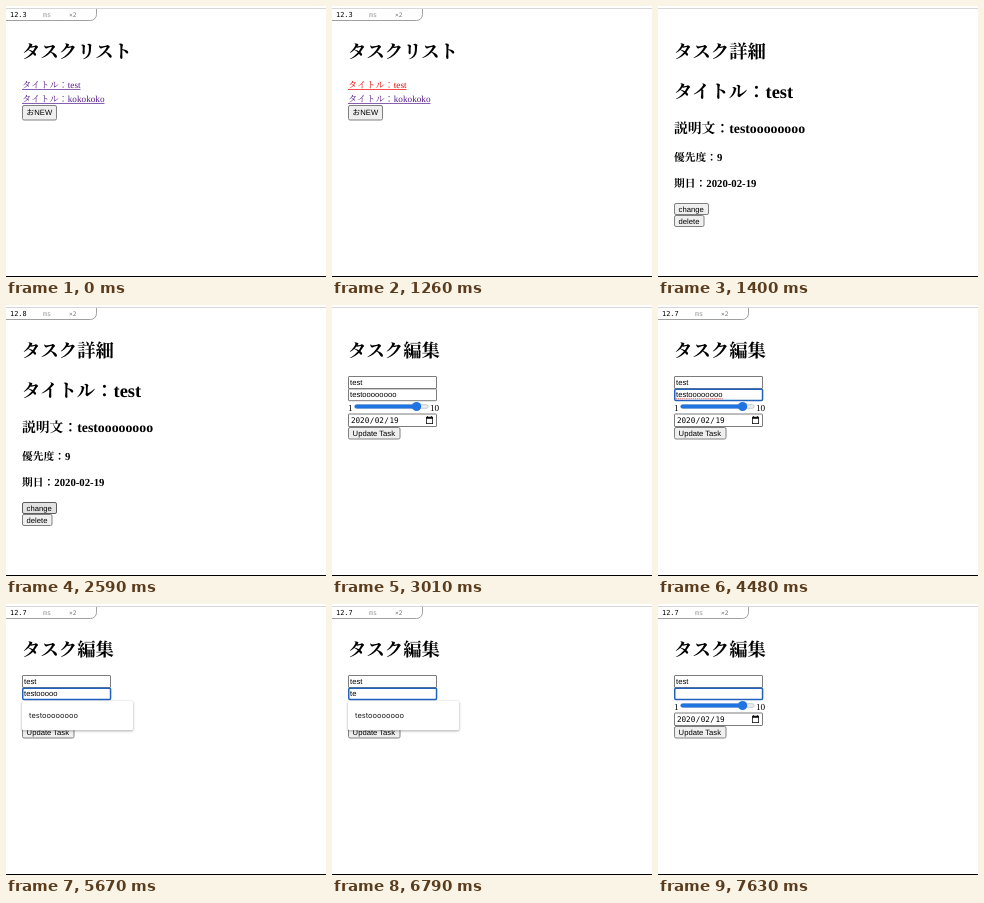
An HTML page with a canvas that plays this animation: 320 px wide and 271 px high, repeating every 8 s.

```html
<!DOCTYPE html>
<html lang="ja">
<head>
<meta charset="utf-8">
<title>Task list</title>
<style>
  html, body { margin: 0; width: 100%; height: 100%; overflow: hidden; background: #fff; }
  canvas { display: block; width: 320px; height: 271px; }
</style>
</head>
<body>
<canvas id="stage"></canvas>
<script>
const W = 320, H = 271, LOOP = 8000;
const SERIF = '"Liberation Serif", "Noto Serif CJK JP", "Noto Sans CJK JP", serif';
const SANS = '"Liberation Sans", "Noto Sans CJK JP", sans-serif';
const MONO = '"DejaVu Sans Mono", monospace';
const UI = 'Inter, sans-serif';
const FIELD = 7.67, BODY = 9.2, H1 = 18.4, H2 = 13.8, H3 = 10.76;
const LEFT = 16;

const canvas = document.getElementById('stage');
const ctx = canvas.getContext('2d');
const ratio = window.devicePixelRatio || 1;
canvas.width = Math.round(W * ratio);
canvas.height = Math.round(H * ratio);
ctx.scale(ratio, ratio);
ctx.textRendering = 'geometricPrecision';

const within = (t, from, to) => t >= from && t < to;

// Value of the last [time, value] pair already reached.
function step(t, pairs) {
  let value = pairs[0][1];
  for (const [start, v] of pairs) if (t >= start) value = v;
  return value;
}

function text(str, x, y, size, family, color = '#000', weight = 'normal') {
  ctx.font = `${weight} ${size}px ${family}`;
  ctx.fillStyle = color;
  ctx.fillText(str, x, y);
  return ctx.measureText(str).width;
}

function rect(x, y, w, h, color) {
  ctx.fillStyle = color;
  ctx.fillRect(x, y, w, h);
}

function box(x, y, w, h, radius, fill, stroke, line = 1) {
  ctx.beginPath();
  ctx.roundRect(x + line / 2, y + line / 2, w - line, h - line, radius);
  ctx.fillStyle = fill;
  ctx.fill();
  ctx.strokeStyle = stroke;
  ctx.lineWidth = line;
  ctx.stroke();
}

function heading(str, y, size) {
  text(str, LEFT, y, size, SERIF, '#000', 'bold');
}

function link(str, y, color) {
  const w = text(str, LEFT, y, BODY, SERIF, color);
  rect(LEFT, y + 1.3, w, 0.7, color);
}

function button(label, y, w, h, state = 'idle') {
  const fill = { idle: '#efefef', hover: '#e2e2e2', active: '#f5f5f5' }[state];
  const stroke = { idle: '#808080', hover: '#5c5c5c', active: '#989898' }[state];
  box(LEFT, y, w, h, 1.5, fill, stroke);
  text(label, LEFT + 4.6, y + h / 2 + 2.7, FIELD, SANS);
}

function input(y, h, state = 'idle') {
  if (state === 'focus') {
    box(LEFT, y, 89.3, h, 1.2, '#fff', '#2262bd', 1.5);
  } else {
    box(LEFT, y, 89, h, 0.5, '#fff', state === 'hover' ? '#4a4a4a' : '#7c7c7c');
  }
}

function slider(hover) {
  const blue = hover ? '#185abc' : '#1f74e2';
  text('1', LEFT, 106, BODY, SERIF);
  box(22.5, 99.4, 74, 4.2, 2, '#efefef', '#b5b5b5', 0.7);
  ctx.fillStyle = blue;
  ctx.beginPath();
  ctx.roundRect(22.5, 99.4, 62, 4.2, 2);
  ctx.fill();
  ctx.beginPath();
  ctx.arc(84.6, 101.5, 4.6, 0, Math.PI * 2);
  ctx.fill();
  text('10', 98, 106, BODY, SERIF);
}

function dateField(hover) {
  input(108.5, 13.5, hover ? 'hover' : 'idle');
  let x = 18.5;
  for (const part of ['2020', '/', '02', '/', '19']) {
    const pad = part === '/' ? 0 : 0.4;
    x += pad + text(part, x + pad, 118, FIELD, MONO) + pad;
  }
  rect(94, 111.8, 7, 7.2, '#111');
  rect(94.8, 113.8, 5.4, 4.4, '#fff');
  rect(95.2, 111, 0.9, 1, '#111');
  rect(98.9, 111, 0.9, 1, '#111');
}

function badge(value) {
  ctx.beginPath();
  ctx.roundRect(-8, -6, 98.5, 20.5, 6);
  ctx.fillStyle = '#fff';
  ctx.fill();
  ctx.strokeStyle = '#a0a0a0';
  ctx.lineWidth = 1;
  ctx.stroke();
  text(value, 4, 11, 6.9, MONO, '#000');
  text('ms', 37, 11, 6.7, MONO, '#999');
  text('×2', 63, 11, 6.2, MONO, '#777');
}

function popup() {
  ctx.save();
  ctx.shadowColor = 'rgba(0,0,0,0.4)';
  ctx.shadowBlur = 2.5 * ratio;
  ctx.shadowOffsetY = 0.7 * ratio;
  ctx.fillStyle = '#fff';
  ctx.beginPath();
  ctx.roundRect(16, 97, 111, 29.2, 1.5);
  ctx.fill();
  ctx.restore();
  text('testoooooooo', 23, 114.2, 7.5, UI, '#222');
}

function listPage(t) {
  heading('タスクリスト', 51.6, H1);
  link('タイトル：test', 81.8, within(t, 1260, 1330) ? '#e00' : '#551a8b');
  link('タイトル：kokokoko', 95.8, '#551a8b');
  button('おNEW', 99, 35, 15.5);
}

function detailPage(t) {
  heading('タスク詳細', 51.6, H1);
  heading('タイトル：test', 92.3, H1);
  heading('説明文：testoooooooo', 126.8, H2);
  heading('優先度：9', 155, H3);
  heading('期日：2020-02-19', 181.4, H3);
  button('change', 197, 35, 12, step(t, [[0, 'idle'], [2590, 'hover'], [2800, 'active'], [2870, 'hover']]));
  button('delete', 209, 30.5, 12);
}

// Characters left in the description as it is deleted.
const typed = [[0, 12], [4620, 11], [5530, 10], [5600, 9], [5880, 8], [6370, 7],
  [6510, 6], [6580, 5], [6650, 4], [6720, 3], [6790, 2], [6930, 1], [7140, 0]];
const caretOn = [[0, false], [3990, true], [4480, false], [4620, true], [5040, false],
  [5460, true], [5670, false], [6090, true], [6510, false], [7140, true], [7630, false]];

function editPage(t) {
  heading('タスク編集', 51.6, H1);
  input(71, 13, 'idle');
  text('test', 18, 80.2, FIELD, SANS);
  slider(within(t, 3570, 3710));
  dateField(within(t, 3430, 3570));
  button('Update Task', 122, 52.5, 12.5);

  input(83.4, 12.8, step(t, [[0, 'idle'], [3710, 'hover'], [3990, 'focus']]));
  const word = 'testoooooooo'.slice(0, step(t, typed));
  const w = text(word, 18, 92.3, FIELD, SANS);
  if (within(t, 4060, 4620)) {
    for (let x = 18; x < 18 + w; x += 1.9) rect(x, 93.3, 1.1, 0.9, '#e8554d');
  }
  if (step(t, caretOn)) rect(18 + w, 85, 0.7, 9, '#000');
  if (within(t, 4620, 7000)) popup();
}

function draw(t) {
  rect(0, 0, W, H, '#fff');
  const page = step(t, [[0, listPage], [1400, detailPage], [3010, editPage]]);
  page(t);
  const value = step(t, [[0, '12.3'], [1400, ''], [1610, '12.8'], [3010, ''], [3080, '12.7']]);
  if (value) badge(value);
  rect(0, 0, W, 2, '#fff');
  rect(0, 2, W, 1, '#d6d6d6');
  rect(0, 270, W, 1, '#000');
}

const start = performance.now();
function tick() {
  draw((performance.now() - start) % LOOP);
  requestAnimationFrame(tick);
}
tick();
</script>
</body>
</html>
```
